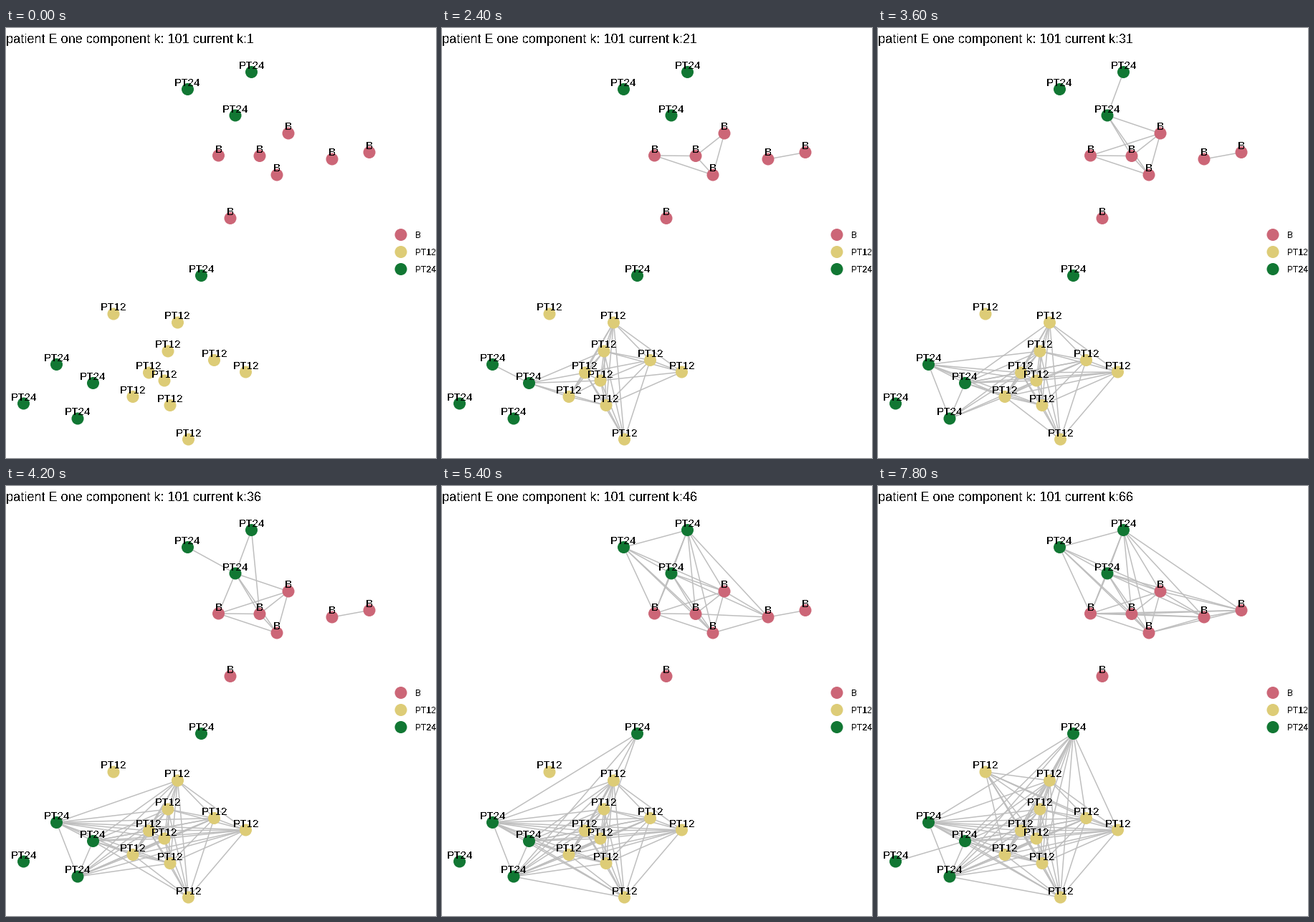
Animation of 600x600 px, one loop 8000 ms. Source, as a matplotlib script:

```python
import matplotlib.pyplot as plt
from matplotlib.animation import FuncAnimation
from matplotlib.collections import LineCollection
from matplotlib.patches import Circle

SIZE, DPI = 600, 100
PT = 72 / DPI  # points per pixel
plt.rcParams["font.family"] = "Liberation Sans"

COLORS = {"B": "#CC6677", "PT12": "#DDCC77", "PT24": "#117733"}
GROUPS = {"PT24": "abckvwxy", "B": "defghij", "PT12": "lmnopqrstu"}
NODES = dict(zip("abcdefghijklmnopqrstuvwxy", [
    (342.5, 61.5), (253.5, 85.5), (320, 122), (394, 147), (296.5, 178),
    (354, 178.5), (378, 205), (455, 183), (507, 173.5), (313, 265.5),
    (272.5, 345.5), (150, 399), (239.5, 411), (226, 451), (290.5, 463.5),
    (334.5, 480), (199.5, 481), (221, 492), (177, 514.5), (229, 526.5),
    (254.5, 574), (70.5, 469.5), (121.5, 495.5), (100, 545), (24.5, 524),
]))

# Links gained at each step: a hub letter followed by its new neighbours.
STEPS = [
    "",
    "qr nr",
    "mnqrt nqst qst rt op fg hi",
    "df ef vw rs st ms umnrtq onrt wsqr",
    "dg eg pnrtm oqm wtn uo",
    "de cfg ups os ps pq vr wmopx xq",
    "vxqtsn cd xsrn ac",
    "bc af ce vmop xmtpo wu",
    "dh gha ab bdf fh uv kv",
    "ahed ch beg xu kxqr",
    "idgcf eh ksnt",
    "ln kuwpom",
    "ei lmqrto",
    "ai wy lusp",
]
TICKS_PER_STEP, TICKS, TICK_MS = 3, 40, 200


def links(step):
    return [(NODES[word[0]], NODES[end])
            for text in STEPS[:step + 1]
            for word in text.split() for end in word[1:]]


fig = plt.figure(figsize=(SIZE / DPI, SIZE / DPI), dpi=DPI, facecolor="white")
ax = fig.add_axes([0, 0, 1, 1])
ax.set(xlim=(0, SIZE), ylim=(SIZE, 0))
ax.axis("off")


def write(x, y, text, px, ha="left"):
    return ax.text(x, y, text, fontsize=px * PT, ha=ha, va="baseline",
                   color="black", antialiased=False, zorder=3)


def dot(x, y, group):
    ax.add_patch(Circle((x, y), 8.5, color=COLORS[group], lw=0, zorder=2))


edges = LineCollection([], colors="#BEBEBE", linewidths=1.5 * PT, zorder=1)
ax.add_collection(edges)

for group, letters in GROUPS.items():
    for letter in letters:
        x, y = NODES[letter]
        dot(x, y, group)
        write(x, y - 4.5, group, 15.2, "center")

for row, group in enumerate(COLORS):
    y = 288.5 + 24 * row
    dot(551, y, group)
    write(570.5, y + 4.5, group, 12.2)

title = write(0, 21, "", 18.2)


def draw(tick):
    step = min(tick // TICKS_PER_STEP, len(STEPS) - 1)
    edges.set_segments(links(step))
    title.set_text(f"patient E one component k: 101 current k:{1 + 5 * step}")
    return edges, title


anim = FuncAnimation(fig, draw, frames=TICKS, interval=TICK_MS,
                     repeat=True, repeat_delay=0)
plt.show()
```
